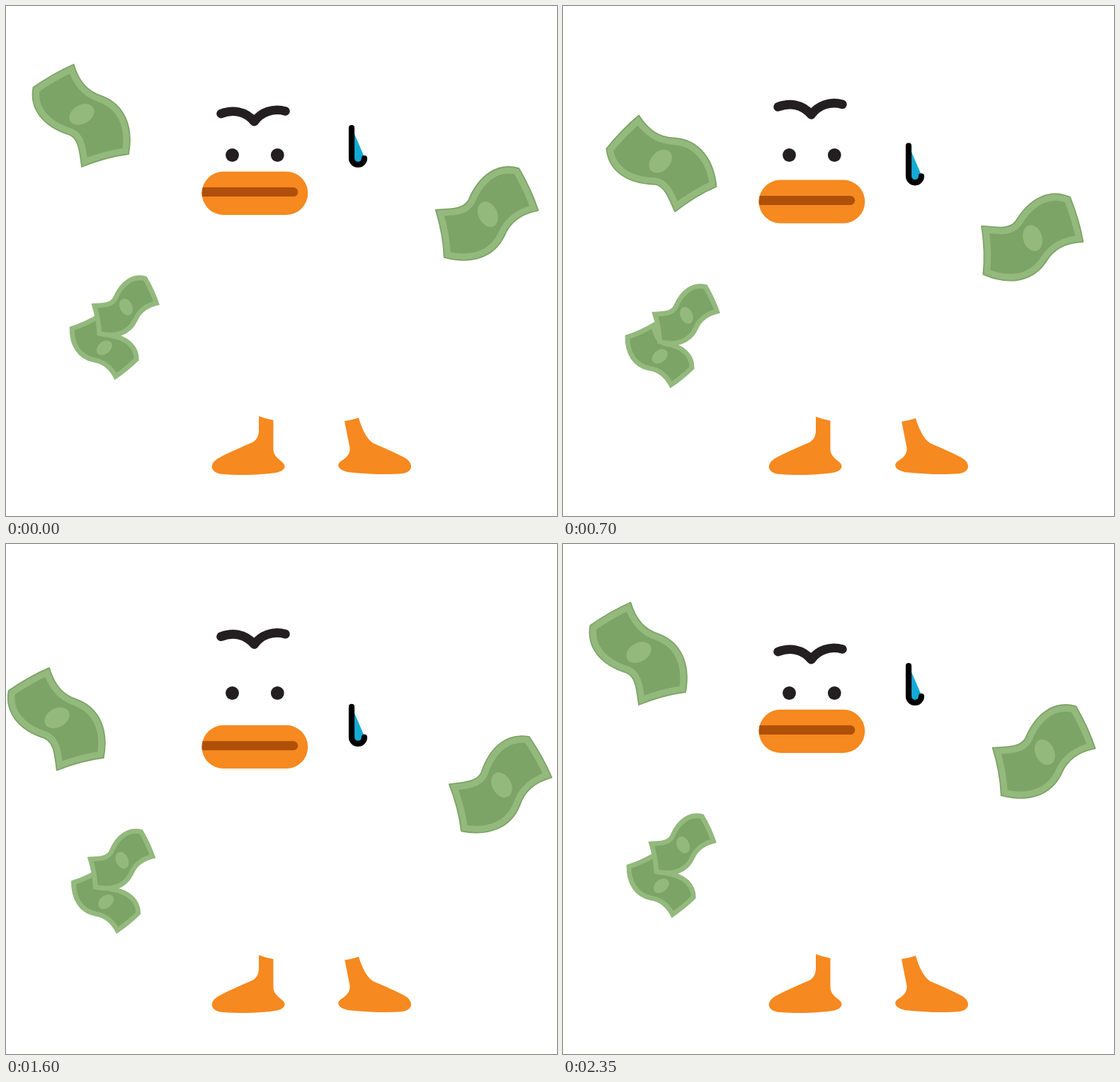
An HTML page with a canvas for the animation above (2.4 s loop, 778 by 720 pixels).

```html
<!DOCTYPE html>
<html lang="en">
<head>
<meta charset="utf-8">
<title>Sweating duck with falling money</title>
<style>
  html, body { margin: 0; width: 100%; height: 100%; overflow: hidden; background: #fff; }
  canvas { display: block; }
</style>
</head>
<body>
<canvas id="stage" width="778" height="720"></canvas>
<script>
const ctx = document.getElementById('stage').getContext('2d');
const LOOP = 2400, STEP = 50, RESET = 2350;
const ORANGE = '#f6891f', INK = '#231f20', GREEN = '#7da467', PALE = '#93b97d';

const clamp = u => Math.min(1, Math.max(0, u));
const easeOut = u => Math.sin(clamp(u) * Math.PI / 2);
const easeInOut = u => (1 - Math.cos(clamp(u) * Math.PI)) / 2;

// Sum of moves, each [start, end, amount] and slowing towards its end.
const glide = (t, ...moves) => moves.reduce(
  (sum, [start, end, amount]) => sum + amount * easeOut((t - start) / (end - start)), 0);

// The notes float down in three swings: out, quickly back, and out again.
const sway = t => glide(t, [100, 1000, 35.4], [1000, 1400, -70.3], [1600, RESET, 40]);
const fall = (t, a, b, c) => glide(t, [0, 1050, a], [1000, 1400, b], [1600, RESET, c]);
const tilt = (t, a, b, c) => glide(t, [0, 700, a], [1000, 1450, b], [1600, RESET, c]);

const beakDrop = t => 22.5 * easeInOut(t / 1350) - 2.3 * easeInOut((t - 1350) / 1000);
const browLift = t => 25 * easeOut(t / RESET) ** 1.2;
const sweatDrop = t => 0.0362 * t;

const notes = [
  { x: 138.8, y: 482.6, angle: 170.7, scale: 0.655, edge: PALE,
    swing: -0.07, drop: [13.7, 8.8, 16.5], turn: [0, 0, 0] },
  { x: 169.5, y: 424.8, angle: 95, scale: 0.655, edge: PALE,
    swing: 0.16, drop: [13.7, 8, 8.8], turn: [0, 0, 0] },
  { x: 107, y: 153, angle: 0, scale: 1, edge: GREEN,
    swing: 1, drop: [76.4, 16, 50.6], turn: [-16, 16.3, -16.1] },
  { x: 680.3, y: 294, angle: 95, scale: 1, edge: GREEN,
    swing: -0.56, drop: [38.9, 7.3, 26.4], turn: [8.4, -12.6, 4.8] }
];

const NOTE = new Path2D(
  'M-11.5-70.5C-4-45 9-32 28-26C60-14 73 17 66 56C43 59 22 65 0 74' +
  'C-3 52-4 35-17 29C-55 17-74-8-68.5-38C-50-51-31-62-11.5-70.5Z');
const BROW = new Path2D('M303.5 152.1C320 145.8 338 148 350.5 163.2C360 150 377 143.5 394.5 148.5');
const MOUTH = new Path2D('M270 262.6H405.8');
const BEAK = new Path2D();
BEAK.roundRect(276.5, 233.7, 149.8, 61.2, 30.6);
const DROP = new Path2D('M490 176L505.5 212L497 223L489 219Z');
const DROP_LINE = new Path2D('M488 172V215A9 9 0 0 0 506 215');

function fill(path, color) {
  ctx.fillStyle = color;
  ctx.fill(path);
}

function stroke(path, color, width) {
  ctx.strokeStyle = color;
  ctx.lineWidth = width;
  ctx.stroke(path);
}

function disc(x, y, rx, ry, angle, color) {
  ctx.fillStyle = color;
  ctx.beginPath();
  ctx.ellipse(x, y, rx, ry, angle, 0, 2 * Math.PI);
  ctx.fill();
}

function shifted(dy, paint) {
  ctx.save();
  ctx.translate(0, dy);
  paint();
  ctx.restore();
}

function drawNote({ x, y, angle, scale, edge, swing, drop, turn }, t) {
  ctx.save();
  ctx.translate(x + swing * sway(t), y + fall(t, ...drop));
  ctx.rotate((angle + tilt(t, ...turn)) * Math.PI / 180);
  ctx.scale(scale, scale);
  ctx.save();
  ctx.clip(NOTE);
  fill(NOTE, GREEN);
  ctx.lineJoin = 'miter';
  stroke(NOTE, PALE, 19);
  ctx.restore();
  ctx.lineJoin = edge === PALE ? 'miter' : 'round';
  stroke(NOTE, edge, 1.8);
  disc(0, 0, 18.8, 13.3, -Math.PI / 6, PALE);
  ctx.restore();
}

// The body hides the top of the legs, a little more as it sinks.
function drawFeet(sink) {
  fill(new Path2D(`M357 ${579 + sink}Q367 ${583 + sink} 377.5 ${584.7 + sink}V626` +
    'C377.5 634 384 639 389 643C397 649 394 656 383 658.5C365 662 330 663 307 661' +
    'C289 660 286 648 298 639.5C310 632 332 623 347 616.5C355 612.5 357 606 357 598Z'), ORANGE);
  fill(new Path2D(`M${478 + sink / 4} ${586 + sink}Q488 ${584.6 + sink} 498 ${581.3 + sink}` +
    'C502 595 508 610 518 617C532 623 553 632 565 639C576 647 574 658 560 660' +
    'C540 662 510 661 487 658.5C472 657 464 649 473 642.5C481 638 486 632 485.5 624Z'), ORANGE);
}

function draw(time) {
  const t = time < RESET ? time : 0;
  ctx.fillStyle = '#fff';
  ctx.fillRect(0, 0, 778, 720);
  ctx.lineCap = ctx.lineJoin = 'round';

  drawFeet(beakDrop(t) * 0.06);
  for (const x of [319.5, 383.3]) disc(x, 210.5, 9.4, 9.4, 0, INK);
  shifted(-browLift(t), () => stroke(BROW, INK, 12.6));
  shifted(beakDrop(t), () => {
    fill(BEAK, ORANGE);
    ctx.clip(BEAK);
    stroke(MOUTH, '#af5009', 13);
  });
  shifted(sweatDrop(t), () => {
    fill(DROP, '#14aad5');
    stroke(DROP_LINE, '#000', 8.2);
  });
  for (const note of notes) drawNote(note, t);
}

const start = performance.now();
function tick() {
  const time = (performance.now() - start) % LOOP;
  draw(Math.floor(time / STEP) * STEP);
  requestAnimationFrame(tick);
}
tick();
</script>
</body>
</html>
```
